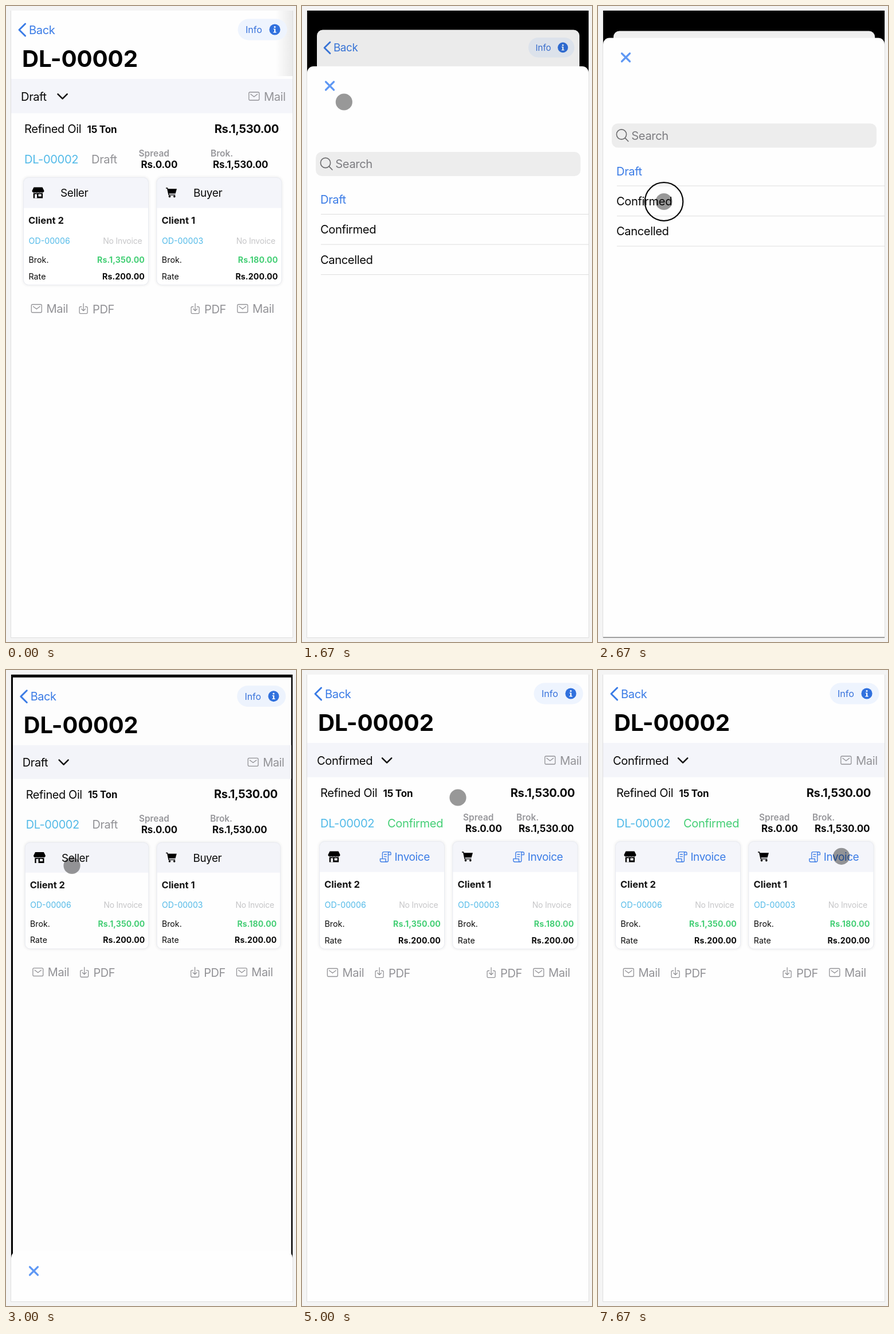
These frames come from a looping animation (506x1107 px, 8 s). An HTML page:

```html
<!DOCTYPE html>
<html lang="en">
<head>
<meta charset="utf-8">
<title>Deal status</title>
<style>
  html, body { margin: 0; width: 100%; height: 100%; overflow: hidden; background: #f4f4f4; }
  svg { display: block; width: 506px; height: 1107px; }
  text { font-family: Inter, Roboto, "Liberation Sans", sans-serif; white-space: pre; }
  .line { fill: none; stroke-linecap: round; stroke-linejoin: round; }
</style>
</head>
<body>
<svg id="stage" viewBox="0 0 506 1107" xmlns="http://www.w3.org/2000/svg">
  <defs>
    <clipPath id="screen"><rect x="9" y="8" width="491" height="1091.5"/></clipPath>
    <linearGradient id="edge"><stop offset="0" stop-color="#000" stop-opacity="0"/><stop offset="1" stop-color="#000" stop-opacity=".08"/></linearGradient>
    <filter id="soft" x="-10%" y="-10%" width="120%" height="120%"><feGaussianBlur stdDeviation="2"/></filter>
  </defs>
  <rect width="506" height="1107" fill="#f4f4f4"/>
  <g clip-path="url(#screen)">
    <rect x="9" y="8" width="491" height="1092"/>
    <g id="page"></g>
    <g id="sheet"></g>
  </g>
  <path d="M8.5 8V1099.5H500.5V8" fill="none" stroke="#dedede"/>
  <path id="foot" d="M9 1099H500" stroke="#858585" stroke-width="1.3"/>
  <circle id="ring" r="33.3" fill="none" stroke="#0a0a0a" stroke-width="2.2"/>
  <circle id="dot" r="14.6" fill-opacity=".4"/>
</svg>
<script>
const LOOP = 8000;
const BLUE = '#3b7ce6', SKY = '#52bae8', GREEN = '#45cf76', GREY = '#929296', INK = '#0a0a0a', BAND = '#f4f5fa';
const byId = id => document.getElementById(id);

// Markup helpers
const text = (x, y, s, size = 20.16, fill = INK, weight = 400, gap = -.4, anchor = 'start') =>
  `<text x="${x}" y="${y}" font-size="${size}" fill="${fill}" font-weight="${weight}" letter-spacing="${gap}" text-anchor="${anchor}">${s}</text>`;
const right = (x, y, s, size, fill, weight, gap) => text(x, y, s, size, fill, weight, gap, 'end');
const line = (d, color, width = 1.4) => `<path class="line" d="${d}" stroke="${color}" stroke-width="${width}"/>`;
const rect = (x, y, w, h, fill, more = '') => `<rect x="${x}" y="${y}" width="${w}" height="${h}" fill="${fill}" ${more}/>`;
const group = (id, body, x = 0, y = 0) => `<g id="${id}" transform="translate(${x} ${y})">${body}</g>`;
const at = (x, y, body) => `<g transform="translate(${x} ${y})">${body}</g>`;

// Icons, drawn from their top left corner
const mail = (x, y) => at(x, y,
  line('M2 0H16Q18 0 18 2V12Q18 14 16 14H2Q0 14 0 12V2Q0 0 2 0ZM3.2 3.5L9 8L14.8 3.5', GREY, 1.3) +
  text(26.2, 14.6, 'Mail', 20.16, GREY));
const pdf = (x, y) => at(x, y,
  line('M4 5.5H2Q.3 5.5 .3 7.2V15.6Q.3 17.3 2 17.3H12.6Q14.3 17.3 14.3 15.6V7.2Q14.3 5.5 12.6 5.5H10.6M7.3 0V12.3M3.9 9.2L7.3 12.5L10.7 9.2', GREY, 1.3) +
  text(23.2, 16.5, 'PDF', 20.16, GREY));
const shop = at(45.5, 315.5,
  '<path d="M3 0H18L21 6Q21 9 18.6 9V19H2.2V9Q0 9 0 6Z"/>' +
  line('M.8 9.4Q3 10.6 5.4 9.2Q8 10.8 10.4 9.2Q13 10.8 15.6 9.2Q18 10.6 20 9.4', BAND, 1) +
  rect(4.6, 12, 4, 7, BAND) + rect(11, 12, 5.2, 4, BAND));
const cart = at(279, 316,
  '<path d="M0 .2H3.1L3.6 2.2H19L16.6 10.4H5.4L5.8 12.2H16.3V13.6H4.5L2 1.7H0Z"/>' +
  '<circle cx="6.5" cy="15.6" r="1.8"/><circle cx="14.8" cy="15.6" r="1.8"/>');
const invoice = x => at(x, 316,
  line('M4.4 12.4V3Q4.4 .6 6.8 .6H16.4Q14.4 1 14.4 3V15.4Q14.4 18 12 18H2.8Q.4 18 .4 15.2V12.6H10V15.2Q10 18 12 18M16.4 .6Q19 .6 19 3V5.6H14.4M7.4 5H11.4M7.4 8.8H11.4', BLUE, 1.35) +
  text(25.4, 16.3, 'Invoice', 19, BLUE));

const amount = (label, value, x) =>
  text(x, 262, label, 15.5, '#97979b', 600, 0) + text(x + 4, 282, value, 17, INK, 700, -.18);

const card = (name, order, fee) =>
  rect(29, 297, 221, 190, '#000', 'rx="10" opacity=".06" filter="url(#soft)"') +
  rect(30.5, 298.5, 218, 187, '#fff', 'rx="9"') +
  `<path d="M30.5 351.5V307.5Q30.5 298.5 39.5 298.5H239.5Q248.5 298.5 248.5 307.5V351.5Z" fill="${BAND}"/>` +
  rect(30.5, 298.5, 218, 187, 'none', 'rx="9" stroke="#e9ebf1"') +
  text(39, 379, name, 16.6, '#151515', 700, 0) +
  text(39.6, 413.5, order, 14.2, SKY, 400, 0) +
  right(237.5, 413.5, 'No Invoice', 14, '#c6c6c8', 400, -.2) +
  text(39.4, 446.5, 'Brok.', 14.2, INK, 400, .1) +
  right(242, 446.5, fee, 14.2, GREEN, 700, .1) +
  text(39.4, 475.5, 'Rate', 14.2, INK, 400, .1) +
  right(242, 475.5, 'Rs.200.00', 14.2, INK, 700, .1);

byId('page').innerHTML =
  rect(9, 8, 491, 1092, '#fefefe', 'id="paper"') +
  rect(470, 8, 30, 114, 'url(#edge)', 'id="glow"') +
  line('M33.6 31L23 41.5L33.6 52', BLUE, 3) + text(40, 48.7, 'Back', 20.16, BLUE) +
  rect(404.5, 22.5, 86, 37, '#eef4fe', 'rx="18.5"') +
  text(418, 47.2, 'Info', 16.2, '#3a74dc', 400, -.1) +
  '<circle cx="469" cy="41" r="9.6" fill="#3171de"/><circle cx="469" cy="36.6" r="1.5" fill="#fff"/>' +
  '<path d="M466.6 39.4H470.2V45H471.6V46.4H466.5V45H468V40.8H466.6Z" fill="#fff"/>' +
  text(28, 105.6, 'DL-00002', 40.3, '#000', 700, -.1) +
  rect(9, 127, 491, 59.5, BAND) +
  text(26, 165, '<tspan id="choice">Draft</tspan>') +
  group('arrow', line('M90.5 153.3L98.6 161.4L106.7 153.3', '#151515', 2.6)) +
  mail(423.8, 150) +
  text(32, 221, 'Refined Oil') + text(141.5, 220.5, '15 Ton', 17, INK, 700, -.2) +
  right(476, 220.5, 'Rs.1,530.00', 20.16, INK, 700, -.4) +
  text(32, 273.5, 'DL-00002', 20.16, SKY) +
  group('before', text(149, 273.5, 'Draft', 20.16, GREY) + amount('Spread', 'Rs.0.00', 231.5) + amount('Brok.', 'Rs.1,530.00', 357)) +
  group('after', text(149, 273.5, 'Confirmed', 20.16, GREEN) + amount('Spread', 'Rs.0.00', 281) + amount('Brok.', 'Rs.1,530.00', 374)) +
  card('Client 2', 'OD-00006', 'Rs.1,350.00') + at(232.4, 0, card('Client 1', 'OD-00003', 'Rs.180.00')) +
  shop + cart +
  group('roles', text(95, 332.3, 'Seller', 19) + text(327, 332.3, 'Buyer', 19)) +
  group('bills', invoice(136) + invoice(368.4)) +
  mail(44.3, 519.5) + pdf(127.8, 518) + pdf(322.8, 518) + mail(403.8, 519.5) +
  rect(9, 8, 491, 1092, '#000', 'id="dim"');

const options = ['Draft', 'Confirmed', 'Cancelled'];
byId('sheet').innerHTML =
  rect(9, 0, 491, 1120, '#fefefe', 'rx="11"') +
  line('M41.5 27L55.5 41M55.5 27L41.5 41', '#5f98f4', 3.2) +
  rect(24, 149, 462, 42, '#ededed', 'rx="10.5"') +
  '<circle cx="41" cy="168" r="8.6" fill="none" stroke="#6c6c6e" stroke-width="1.6"/>' +
  line('M47.3 174.4L52.8 180', '#6c6c6e', 1.7) +
  text(58.3, 177.3, 'Search', 20.16, '#7c7c80') +
  options.map((name, i) => text(32, 239 + i * 52.4, name, 20.16, i ? INK : BLUE) +
    `<path d="M33 ${257.5 + i * 52.5}H500" stroke="#dedede"/>`).join('');

// Pointer stops: time, x, y
const pointer = [
  [670, 45, 165], [1000, 71, 170], [1330, 73.3, 167], [2000, 85, 225], [2330, 111, 334],
  [2670, 115, 340.5], [3670, 103, 288], [4000, 265, 226.5], [4330, 272, 222], [5670, 312, 226],
  [6000, 388.3, 285.3], [6330, 430, 320], [6670, 424.7, 324.3]
];
// Page and sheet stops: time, page left, page top, page scale, dim, sheet top
const views = [
  [0, 9, 8, 1, 0, 1200], [1670, 26, 41.5, .933, .075, 105], [2000, 27, 43.5, .929, .06, 55.5],
  [3000, 12, 13, .989, .005, 1012], [3330, 9, 8, 1, 0, 1200]
];
const pick = (stops, t) => stops.filter(s => s[0] <= t).pop();
const show = (id, on) => byId(id).setAttribute('visibility', on ? 'visible' : 'hidden');
const move = (id, value) => byId(id).setAttribute('transform', value);

function draw(t) {
  const [, left, top, scale, dim, sheet] = pick(views, t);
  move('page', `translate(${left} ${top}) scale(${scale}) translate(-9 -8)`);
  move('sheet', `translate(0 ${sheet})`);
  byId('dim').setAttribute('opacity', dim);
  for (const id of ['paper', 'dim']) byId(id).setAttribute('rx', scale < .95 ? 11 : 0);
  show('glow', t < 1670);
  show('foot', t >= 2000 && t < 3000);

  const chosen = t >= 3670, saved = t >= 4330;
  byId('choice').textContent = options[+chosen];
  move('arrow', `translate(${chosen ? 49.5 : 0} 0)`);
  for (const id of ['before', 'roles']) show(id, !saved);
  for (const id of ['after', 'bills']) show(id, saved);

  const spot = pick(pointer, t);
  show('dot', spot);
  show('ring', t >= 2670 && t < 3000);
  if (spot) for (const id of ['dot', 'ring']) move(id, `translate(${spot[1]} ${spot[2]})`);
}

function tick() {
  draw(performance.now() % LOOP);
  requestAnimationFrame(tick);
}
tick();
</script>
</body>
</html>
```
